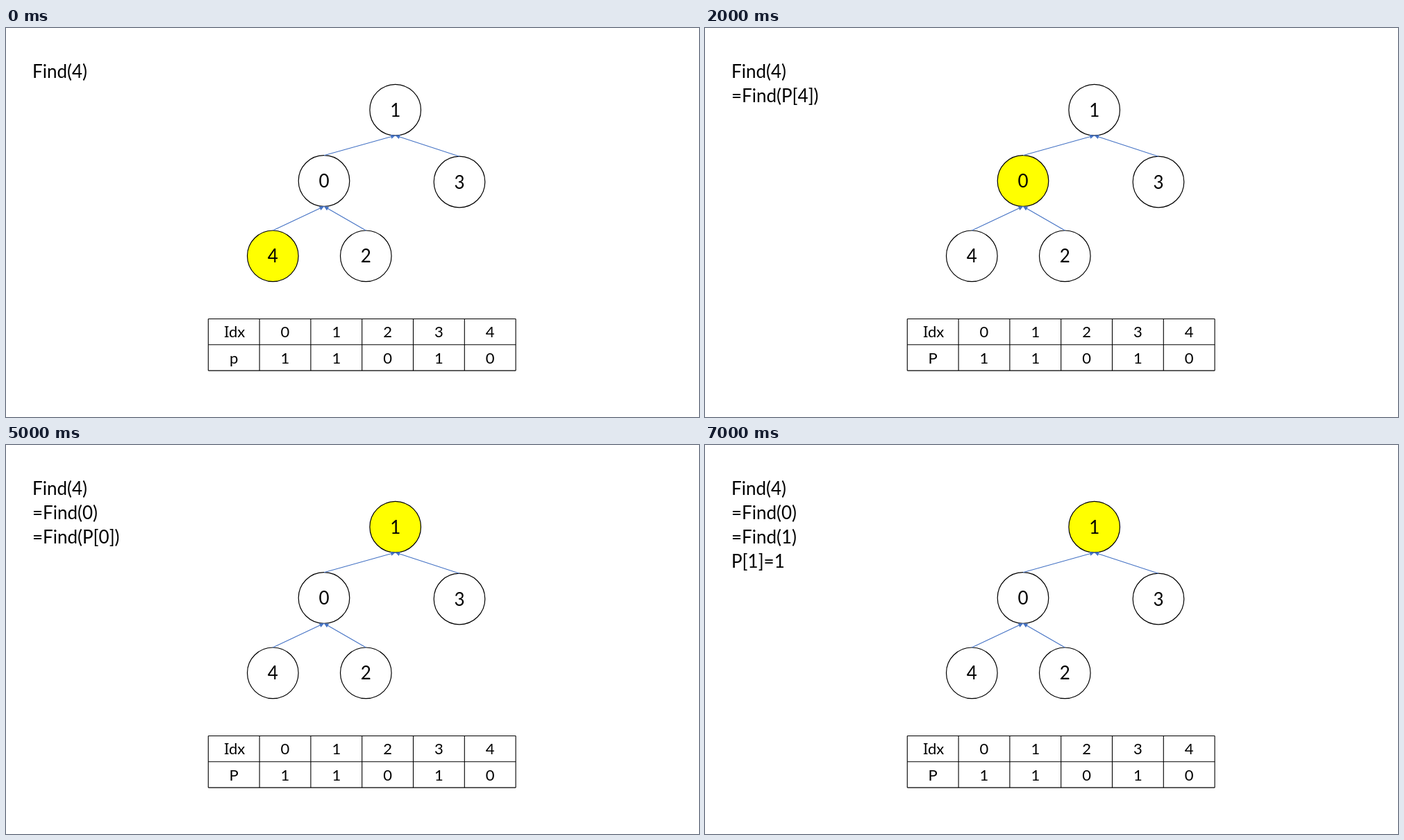
Write an HTML page with a canvas that moves like this. It is 998 px wide and 561 px high and loops after 8000 ms.

```html
<!DOCTYPE html>
<html lang="en">
<head>
<meta charset="utf-8">
<title>Union-find lookup</title>
<style>
  html, body { margin: 0; width: 100%; height: 100%; overflow: hidden; background: #fff; }
  canvas { display: block; }
</style>
</head>
<body>
<canvas id="stage" width="998" height="561"></canvas>
<script>
const ctx = document.getElementById('stage').getContext('2d');
const STEP = 1000;
const RADIUS = 36.8;
const INK = '#000';
const BLUE = '#4472c4';

const nodes = {
  0: { x: 458, y: 220.5 },
  1: { x: 560.7, y: 118.2 },
  2: { x: 518.3, y: 328.8 },
  3: { x: 653, y: 222 },
  4: { x: 384.3, y: 328.8 }
};
const parents = [1, 1, 0, 1, 0];

const steps = [
  { active: 4, lines: ['Find(4)'] },
  { active: 4, lines: ['Find(4)', 'P[4]!=4'] },
  { active: 0, lines: ['Find(4)', '=Find(P[4])'] },
  { active: 0, lines: ['Find(4)', '=Find(0)'] },
  { active: 0, lines: ['Find(4)', '=Find(0)', 'P[0]!=0'] },
  { active: 1, lines: ['Find(4)', '=Find(0)', '=Find(P[0])'] },
  { active: 1, lines: ['Find(4)', '=Find(0)', '=Find(1)'] },
  { active: 1, lines: ['Find(4)', '=Find(0)', '=Find(1)', 'P[1]=1'] }
];

function text(str, x, y, size, align = 'center', family = 'Lato, Carlito') {
  ctx.font = `${size}px ${family}, sans-serif`;
  ctx.textAlign = align;
  ctx.fillStyle = INK;
  ctx.fillText(str, x, y);
}

function line(x1, y1, x2, y2) {
  ctx.beginPath();
  ctx.moveTo(x1, y1);
  ctx.lineTo(x2, y2);
  ctx.stroke();
}

function drawEdge(child, parent) {
  const x = parent.x, y = parent.y + RADIUS;
  const startY = child.y - RADIUS;
  ctx.strokeStyle = ctx.fillStyle = BLUE;
  ctx.lineWidth = 1.1;
  line(child.x, startY, x, y);

  ctx.save();
  ctx.translate(x, y);
  ctx.rotate(Math.atan2(y - startY, x - child.x));
  ctx.beginPath();
  ctx.moveTo(0, 0);
  ctx.lineTo(-6.5, -3.2);
  ctx.lineTo(-6.5, 3.2);
  ctx.fill();
  ctx.restore();
}

function drawNode(label, { x, y }, active) {
  ctx.beginPath();
  ctx.arc(x, y, RADIUS, 0, Math.PI * 2);
  ctx.fillStyle = active ? '#ff0' : '#fff';
  ctx.fill();
  ctx.strokeStyle = INK;
  ctx.lineWidth = 1.2;
  ctx.stroke();
  text(label, x, y + 9.5, 26);
}

function drawTable(parentLabel) {
  const left = 291.3, top = 419.5, cellW = 73.8, cellH = 37.3;
  ctx.strokeStyle = INK;
  ctx.lineWidth = 1.1;
  for (let i = 0; i <= 6; i++) {
    line(left + i * cellW, top, left + i * cellW, top + 2 * cellH);
  }
  for (let i = 0; i <= 2; i++) {
    line(left, top + i * cellH, left + 6 * cellW, top + i * cellH);
  }

  const centre = col => left + (col + 0.5) * cellW;
  const rowY = row => top + row * cellH + 26.8;
  // The heading's capital I carries serifs.
  text('I', 321.5, rowY(0), 22, 'right', 'Noto Sans');
  text('dx', 321, rowY(0), 22, 'left');
  text(parentLabel, centre(0), rowY(1), 22);
  parents.forEach((parent, i) => {
    text(i, centre(i + 1), rowY(0), 22);
    text(parent, centre(i + 1), rowY(1), 22);
  });
}

function draw(now) {
  const index = Math.floor(now / STEP) % steps.length;
  const { active, lines } = steps[index];
  ctx.fillStyle = '#fff';
  ctx.fillRect(0, 0, 998, 561);

  for (const id in nodes) drawNode(id, nodes[id], Number(id) === active);
  parents.forEach((parent, id) => {
    if (parent !== id) drawEdge(nodes[id], nodes[parent]);
  });
  drawTable(index === 0 ? 'p' : 'P');
  lines.forEach((str, i) => text(str, 38, 72 + i * 35, 26, 'left'));
}

const start = performance.now();
function tick() {
  draw(performance.now() - start);
  requestAnimationFrame(tick);
}
tick();
</script>
</body>
</html>
```
